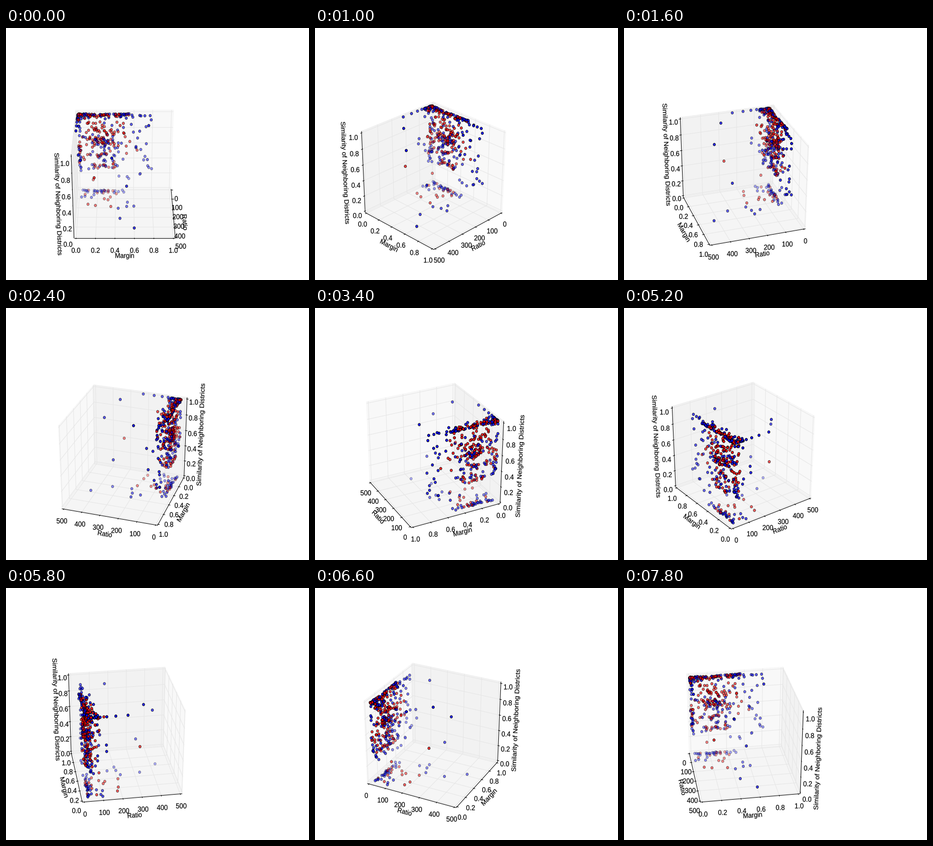
A matplotlib script for the animation above (8 s loop, 600x500 px).

```python
import math

import matplotlib.pyplot as plt
import numpy as np
from matplotlib.animation import FuncAnimation
from matplotlib.collections import LineCollection, PolyCollection
from matplotlib.patches import PathPatch
from matplotlib.path import Path
from matplotlib.textpath import TextPath
from matplotlib.transforms import Affine2D

W, H, DPI = 600, 500, 100
PX = 72 / DPI                    # one pixel in points
FRAMES, INTERVAL = 40, 200
ELEV, DIST = math.radians(30), 10
CENTER, SCALE = (235, 287.5), (1890, 1788)
ASPECT = 0.9                     # pixel aspect shared by glyphs and markers
LABEL_EM, TICK_EM = 13.9, 14.4
DELTA = 1 / 12
EDGE = 0.5 + DELTA / 4           # half size of the padded box

# name, tick step, tick format, tick direction, pane grey
AXES = [
    ("Ratio", 100, "{:.0f}", 1, 0.95),
    ("Margin", 0.2, "{:.1f}", 0, 0.90),
    ("Similarity of Neighboring Districts", 0.2, "{:.1f}", 0, 0.925),
]

# ---------------------------------------------------------------- data
rng = np.random.default_rng(12)


def uniform(lo, hi):
    return lambda n: rng.uniform(lo, hi, n)


def normal(mean, dev):
    return lambda n: np.clip(rng.normal(mean, dev, n), 0.02, 0.98)


def decay(start, scale):
    return lambda n: start + np.minimum(rng.exponential(scale, n), 4 * scale)


def blob(n, ratio, margin, sim, red):
    """Rows of ratio, margin, similarity, is_red."""
    return np.column_stack([ratio(n), margin(n), sim(n), rng.random(n) < red])


def make_data():
    low = decay(16, 26)
    core = normal(0.25, 0.10)
    perfect, none = uniform(0.995, 1), uniform(0, 0.004)
    parts = [
        blob(88, decay(16, 16), uniform(0.01, 0.58), perfect, 0.6),
        blob(22, uniform(15, 75), uniform(0, 0.015), perfect, 0.1),
        blob(32, low, uniform(0, 0.025), uniform(0.3, 0.97), 0.25),
        blob(78, low, core, uniform(0.62, 0.92), 0.75),
        blob(24, low, uniform(0.02, 0.56), uniform(0.15, 0.85), 0.4),
        blob(38, decay(22, 24), uniform(0.02, 0.5), none, 0.36),
        blob(20, decay(25, 22), uniform(0.55, 0.8), uniform(0.2, 1), 0.05),
        blob(4, decay(35, 5), uniform(0.65, 0.82), perfect, 0),
        blob(6, uniform(90, 230), uniform(0, 0.6), none, 0.2),
    ]
    # tied districts share a few similarity levels
    parts += [blob(25, low, core, normal(level, 0.022), 0.45)
              for level in (0.35, 0.5, 0.64)]
    # unopposed wins trail off along one edge
    parts += [[(r, 0, 1, 0)] for r in np.geomspace(90, 227, 4)]
    # isolated far points
    parts.append([
        (425, 0.60, 0, 0), (327, 0.45, 0, 0), (221, 0.43, 0, 0),
        (383, 0.37, 0.835, 0), (322, 0.207, 1, 0), (310, 0.52, 0.4, 0),
        (163, 0.75, 1, 0), (304, 0.183, 0.5, 1), (202, 0.35, 0, 1),
    ])
    return rng.permutation(np.vstack(parts))


data = make_data()
points = data[:, :3] / (500, 1, 1) - 0.5
colors = np.where(data[:, 3:] > 0, (1.0, 0, 0, 1), (0, 0, 1.0, 1))


# ---------------------------------------------------------------- geometry
def project(p, azim):
    """Screen positions and depth of points in the centred unit cube."""
    x, y, z = np.moveaxis(np.asarray(p, float), -1, 0)
    c, s = math.cos(azim), math.sin(azim)
    near = c * x + s * y
    depth = DIST - near * math.cos(ELEV) - z * math.sin(ELEV)
    up = z * math.cos(ELEV) - near * math.sin(ELEV)
    sx = CENTER[0] + SCALE[0] * (c * y - s * x) / depth
    sy = CENTER[1] - SCALE[1] * up / depth
    return np.stack([sx, sy], -1), depth


def along(p, i, value):
    """Copy of p with coordinate i replaced."""
    q = np.array(p, float)
    q[i] = value
    return q


def glyphs(text, pos, size, drop, angle=0.0):
    """Outline of text centred on pos, its baseline drop pixels below."""
    path = TextPath((0, 0), text, size=size, prop={"family": "Liberation Sans"})
    box = path.get_extents()
    place = (Affine2D().translate(-(box.x0 + box.x1) / 2, -drop)
             .rotate_deg(angle).scale(ASPECT, -1).translate(*pos))
    return place.transform_path(path)


def text_angle(a, b):
    dx, dy = b - a
    angle = math.degrees(math.atan2(-dy, dx / ASPECT)) % 180
    return angle - 180 if angle > 90 else angle


def scene(azim):
    """Panes, grid lines, axis lines and text outlines for one view."""
    def flat(p):
        return project(p, azim)[0]

    camera = (math.cos(azim), math.sin(azim), 1)
    back = np.array([-EDGE if c > -1e-9 else EDGE for c in camera])
    panes, grid, lines, text = [], [], [], []
    for i, (name, unit, form, side, _) in enumerate(AXES):
        j, k = (i + 1) % 3, (i + 2) % 3
        corners = [(-1, -1), (1, -1), (1, 1), (-1, 1)]
        panes.append(flat([along(along(back, j, u * EDGE), k, v * EDGE)
                           for u, v in corners]))

        edge = along(back, side, -back[side])
        out = along(np.sign(edge), i, 0) * DELTA
        ends = flat([along(edge, i, -EDGE), along(edge, i, EDGE)])
        lines.append(ends)
        text.append(glyphs(name, flat(along(edge, i, 0) + 1.6 * out),
                           LABEL_EM, 5, text_angle(*ends)))

        step = along(np.zeros(3), side, out[side])
        for n in range(6):
            at = n / 5 - 0.5
            corner, base = along(back, i, at), along(edge, i, at)
            grid.append(flat([along(corner, j, -back[j]), corner,
                              along(corner, k, -back[k])]))
            lines.append(flat([base - 0.1 * step, base + 0.2 * step]))
            text.append(glyphs(form.format(n * unit), flat(base + 0.7 * out),
                               TICK_EM, 14))
    return panes, grid, lines, Path.make_compound_path(*text)


# ---------------------------------------------------------------- drawing
fig = plt.figure(figsize=(W / DPI, H / DPI), dpi=DPI, facecolor="white")
ax = fig.add_axes([0, 0, 1, 1])
ax.axis("off")

pane_colors = [(g, g, g, 0.5) for *_, g in AXES]
pane_art = PolyCollection([], facecolors=pane_colors, edgecolors=pane_colors,
                          linewidths=PX, zorder=1)
grid_art = LineCollection([], colors="0.9", linewidths=PX, zorder=2)
line_art = LineCollection([], colors="black", linewidths=PX, zorder=3)
for art in (pane_art, grid_art, line_art):
    ax.add_collection(art, autolim=False)
text_art = ax.add_patch(PathPatch(Path([(0, 0)]), fc="black", ec="black",
                                  lw=0.2 * PX, zorder=4))
oval = Affine2D().scale(ASPECT, 1).transform_path(Path.unit_circle())
dots = ax.scatter(points[:, 0], points[:, 1], s=(5.2 * PX) ** 2, marker=oval,
                  linewidths=PX, zorder=5)
ax.set(xlim=(0, W), ylim=(H, 0))


def update(frame):
    azim = 2 * math.pi * frame / FRAMES
    panes, grid, lines, text = scene(azim)
    pane_art.set_verts(panes)
    grid_art.set_segments(grid)
    line_art.set_segments(lines)
    text_art.set_path(text)

    where, depth = project(points, azim)
    face = colors.copy()
    face[:, 3] = 1 - 0.7 * (depth - depth.min()) / np.ptp(depth)
    dots.set_offsets(where)
    dots.set_facecolors(face)
    dots.set_edgecolors(face * (0, 0, 0, 1))
    return pane_art, grid_art, line_art, text_art, dots


anim = FuncAnimation(fig, update, frames=FRAMES, interval=INTERVAL,
                     repeat=True, repeat_delay=0)
plt.show()
```
